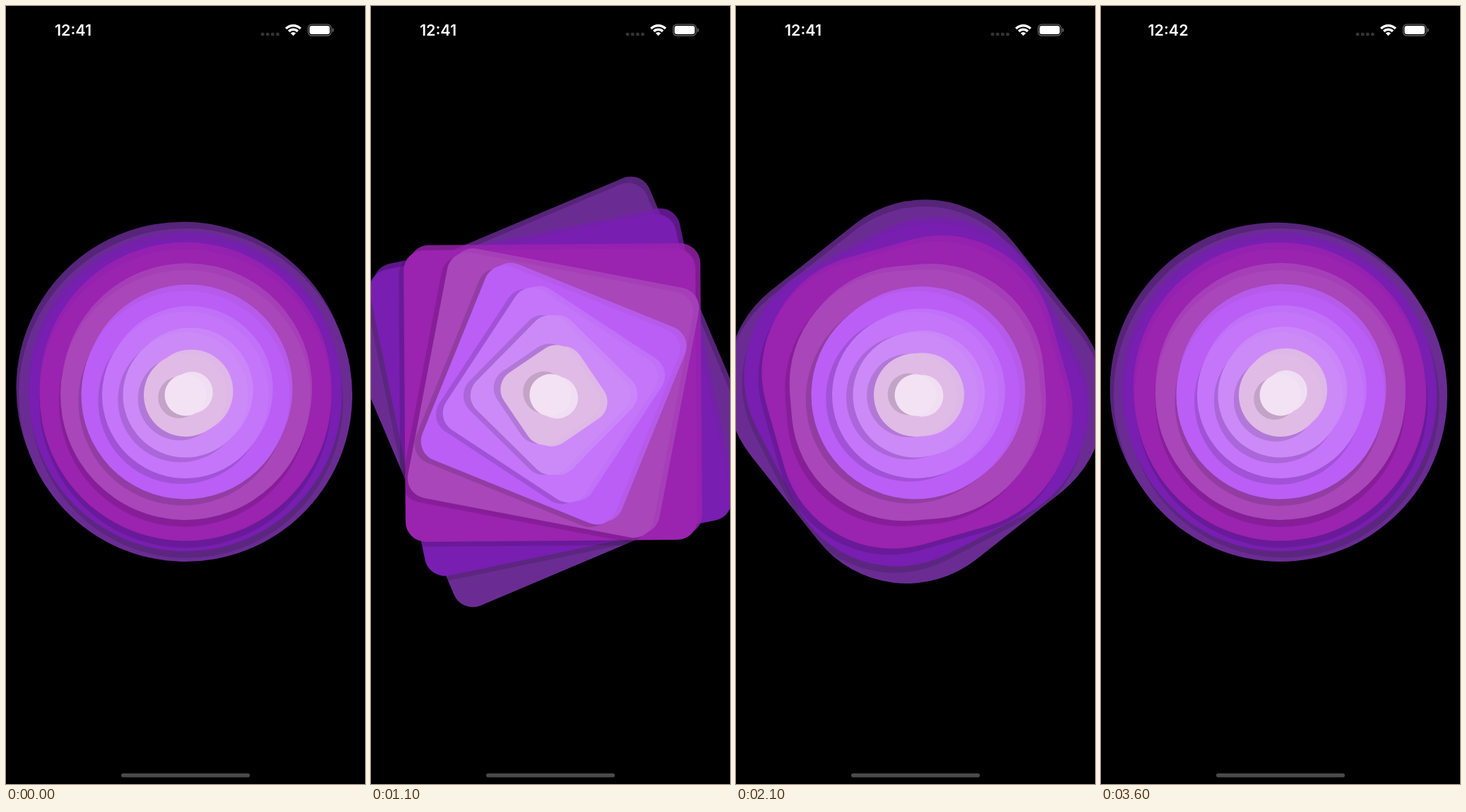
Animation of 508 by 1102 pixels, one loop 3700 ms. Source, as an HTML page with a canvas:

```html
<!DOCTYPE html>
<html lang="en">
<head>
<meta charset="utf-8">
<title>Nested morphing squares</title>
<style>
  html, body { margin: 0; width: 100%; height: 100%; overflow: hidden; background: #000; }
  canvas { display: block; width: 508px; height: 1102px; }
</style>
</head>
<body>
<canvas id="stage"></canvas>
<script>
const W = 508, H = 1102;
const LOOP = 3700, STEP = 100;
const SWING = 2000;      // ms from one extreme pose to the other
const LEAD = 640;        // ms already elapsed in the swing at the loop start
const CLOCK_TICK = 3400;
const UNIT = 59;         // size step between layers
const SHIFT = 7;         // shadow offset along each axis
const TWIST = 11.25;     // degrees between neighbouring layers

// innermost first; size in units
const layers = [
  { size: 1,   color: '#f2e2f4', glow: 0.95 },
  { size: 2,   color: '#e0bbe5', glow: 0.95 },
  { size: 3,   color: '#cc8af8', glow: 0.82 },
  { size: 4,   color: '#c475f9', glow: 0.82 },
  { size: 5,   color: '#ba5ef6', glow: 0.82 },
  { size: 6,   color: '#a846ba', glow: 0.82 },
  { size: 7,   color: '#9a23af', glow: 0.82 },
  { size: 7.5, color: '#781eb0', glow: 0.78 },
  { size: 8,   color: '#6a2c93', glow: 0.82 }
];

const canvas = document.getElementById('stage');
const ctx = canvas.getContext('2d');
const ratio = window.devicePixelRatio || 1;
canvas.width = W * ratio;
canvas.height = H * ratio;

function box(x, y, w, h, r, color, alpha = 1) {
  ctx.globalAlpha = alpha;
  ctx.fillStyle = color;
  ctx.beginPath();
  ctx.roundRect(x, y, w, h, r);
  ctx.fill();
  ctx.globalAlpha = 1;
}

function drawLayer({ size, color, glow }, index, turn, radius) {
  const side = size * UNIT, half = side / 2;
  const r = Math.min(radius, half);
  const square = (shift, fill, alpha) =>
    box(shift - half, -shift - half, side, side, r, fill, alpha);
  ctx.save();
  ctx.translate(W / 2, H / 2);
  ctx.rotate((turn - index * TWIST) * Math.PI / 180);
  square(SHIFT, color, glow);
  square(-SHIFT, '#000', 0.13);
  square(0, color, 1);
  ctx.restore();
}

function drawWifi(x, y) {
  const from = -Math.PI * 0.75, to = -Math.PI * 0.25;
  ctx.fillStyle = '#fff';
  for (const [inner, outer] of [[0, 5.2], [7.2, 10.7], [12.8, 16.3]]) {
    ctx.beginPath();
    ctx.arc(x, y, outer, from, to);
    ctx.arc(x, y, inner, to, from, true);
    ctx.fill();
  }
}

function drawBattery() {
  ctx.strokeStyle = '#686868';
  ctx.lineWidth = 1.3;
  ctx.beginPath();
  ctx.roundRect(427.6, 26.2, 32.4, 15.8, 5);
  ctx.stroke();
  box(429.5, 28.1, 28.6, 12, 3.3, '#fff');
  box(461.6, 31.3, 2, 5.6, [0, 2, 2, 0], '#686868');
}

function drawChrome(t) {
  ctx.fillStyle = '#fff';
  ctx.font = '600 21.5px Inter, sans-serif';
  ctx.textAlign = 'center';
  ctx.fillText(t < CLOCK_TICK ? '12:41' : '12:42', 95, 42);
  for (let i = 0; i < 4; i++) box(360.8 + i * 7.1, 37.8, 4.6, 4.4, 1.5, '#343434');
  drawWifi(406.5, 42.3);
  drawBattery();
  box(163, 1087, 182, 5.6, 2.8, '#4a4a4a');
}

function draw(t) {
  const p = (1 - Math.cos(Math.PI * (t + LEAD) / SWING)) / 2;
  const turn = 10 + 59.5 * p;
  const radius = 8 + 503 * (1 - p);
  ctx.setTransform(ratio, 0, 0, ratio, 0, 0);
  ctx.fillStyle = '#000';
  ctx.fillRect(0, 0, W, H);
  for (let i = layers.length - 1; i >= 0; i--) drawLayer(layers[i], i, turn, radius);
  drawChrome(t);
}

const start = performance.now();
function frame() {
  const t = (performance.now() - start) % LOOP;
  draw(Math.floor(t / STEP) * STEP);
  requestAnimationFrame(frame);
}
frame();
</script>
</body>
</html>
```
